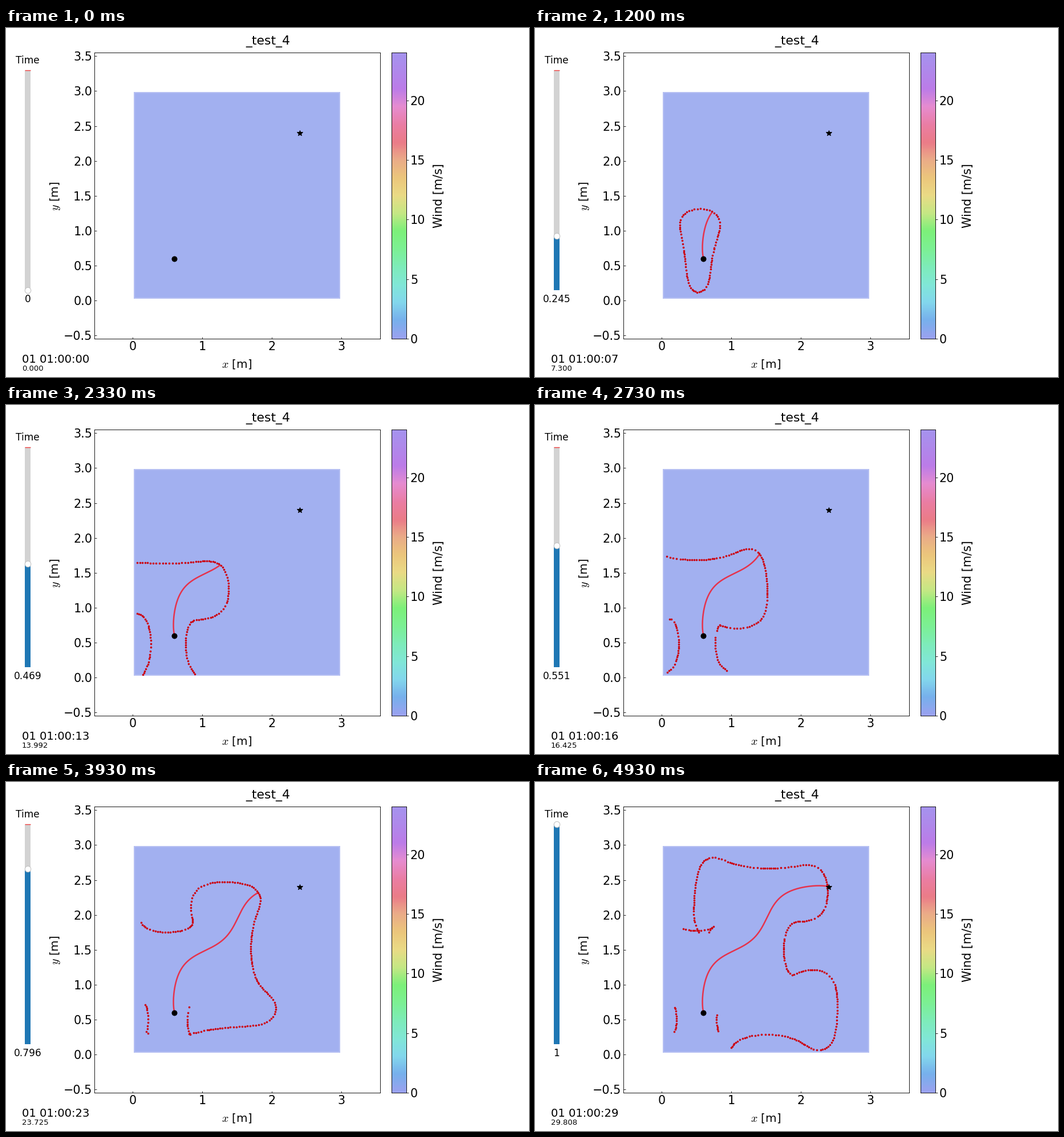
Write a matplotlib script that moves like this. It is 917 by 611 pixels and loops after 5060 ms.

```python
import numpy as np
import matplotlib.pyplot as plt
from matplotlib.animation import FuncAnimation
from matplotlib.colors import LinearSegmentedColormap
from matplotlib.patches import Rectangle

W, H, DPI = 917, 611, 72              # at 72 dpi one point is one pixel
INTERVAL, FRAMES = 20, 253
LAST, SUBSTEPS = 49, 6                # shown steps, solver steps in each
DURATION = 29.808
DT = DURATION / (LAST * SUBSTEPS)

START, GOAL = np.array([0.6, 0.6]), np.array([2.4, 2.4])
SPEED = 0.05                          # own speed of the traveller
FLOW = 0.02 * np.pi                   # peak speed of the gyres
LOW, HIGH = 0.04, 2.96                # dots beyond these limits vanish
MIN_GAP, MAX_GAP = 0.024, 0.055       # spacing of the dots
CELL, MEMORY = 0.06, 1.5              # wake grid size, seconds before it closes

plt.rcParams.update({
    "font.family": "DejaVu Sans", "mathtext.fontset": "cm",
    "axes.linewidth": 0.9, "font.size": 20.8,
})


# --- reachability front ----------------------------------------------------
def rates(pos, head):
    """Drift plus own speed, and the turning of the heading in the flow."""
    sx, sy = np.sin(np.pi * pos).T
    cx, cy = np.cos(np.pi * pos).T
    hx, hy = head.T
    drift = FLOW * np.column_stack([cx * sy, -sx * cy])
    own = SPEED * head / np.linalg.norm(head, axis=1, keepdims=True)
    turn = FLOW * np.pi * np.column_stack([sx * sy * hx + cx * cy * hy,
                                           -cx * cy * hx - sx * sy * hy])
    return drift + own, turn


def advance(pos, head):
    move, turn = rates(pos, head)
    move, turn = rates(pos + move * DT / 2, head + turn * DT / 2)
    head = head + turn * DT
    return pos + move * DT, head / np.linalg.norm(head, axis=1, keepdims=True)


def gaps(track):
    pos = track[:, -1]
    return np.linalg.norm(np.roll(pos, -1, axis=0) - pos, axis=1)


def simulate():
    """Return the front at every step and the track that ends at the goal."""
    angle = np.linspace(0, 2 * np.pi, 72, endpoint=False)
    head = np.column_stack([np.cos(angle), np.sin(angle)])
    track = np.stack([START + 0 * head, START + 0.002 * head], axis=1)
    linked = np.ones(len(head), bool)          # joined to the next dot
    cells = int(HIGH / CELL) + 1
    seen = np.full((cells, cells), np.nan)     # last visit of each cell
    fronts = [np.empty((0, 2))]

    for n in range(1, LAST * SUBSTEPS + 1):
        pos, head = advance(track[:, -1], head)
        track = np.concatenate([track, pos[:, None]], axis=1)

        # Drop dots that left the domain or entered an already swept cell.
        cell = np.clip((pos / CELL).astype(int), 0, cells - 1)
        stale = n * DT - seen[cell[:, 0], cell[:, 1]] > MEMORY
        alive = ((pos > LOW) & (pos < HIGH)).all(axis=1) & ~stale
        seen[cell[alive, 0], cell[alive, 1]] = n * DT
        linked &= alive & np.roll(alive, -1)
        track, head, linked = track[alive], head[alive], linked[alive]

        # Thin crowded dots, then fill wide gaps.
        if len(track) > 80:
            drop = linked & np.roll(linked, 1) & (gaps(track) < MIN_GAP)
            drop[::2] = False
            track, head, linked = track[~drop], head[~drop], linked[~drop]
        wide = np.flatnonzero(linked & (gaps(track) > MAX_GAP))
        after = (wide + 1) % len(track)
        track = np.insert(track, wide + 1, (track[wide] + track[after]) / 2, axis=0)
        head = np.insert(head, wide + 1, (head[wide] + head[after]) / 2, axis=0)
        linked = np.insert(linked, wide + 1, True)

        if n % SUBSTEPS == 0:
            fronts.append(track[:, -1].copy())

    nearest = np.linalg.norm(track[:, -1] - GOAL, axis=1).argmin()
    return fronts, track[nearest]


fronts, route = simulate()

# --- plot ------------------------------------------------------------------
fig = plt.figure(figsize=(W / DPI, H / DPI), dpi=DPI, facecolor="white")


def place(left, top, right, bottom, **kw):
    return fig.add_axes([left / W, 1 - bottom / H,
                         (right - left) / W, (bottom - top) / H], **kw)


ax = place(154.7, 43.2, 655.6, 544.2)
ax.set(xlim=(-0.55, 3.55), ylim=(-0.55, 3.55),
       xticks=range(4), yticks=np.arange(-0.5, 3.6, 0.5))
ax.tick_params(direction="in", length=3.5, pad=3.5, width=0.8)
ax.add_patch(Rectangle((0.025, 0.035), 2.95, 2.943, fc="#a2b0f0",
                       ec="#b6c0f3", lw=2))
path_line, = ax.plot([], [], color="#e6324b", lw=2.5)
dots, = ax.plot([], [], "o", ms=3.6, mew=0, color="#cc0310", zorder=3)
ax.plot(*START, "o", ms=10, mew=0, color="black", zorder=4)
ax.plot(*GOAL, "*", ms=11, mew=1, color="black", zorder=4)

WIND = ["#9aa2f0", "#77b0ec", "#83d7ed", "#81e7d7", "#7eecb9", "#7cf094",
        "#7cf07a", "#c4e884", "#eadb86", "#ecc67c", "#eaac88", "#ea7c88",
        "#ea7ea4", "#e68cd0", "#bc7ce8", "#b088eb", "#a693ee"]
bar = place(676.2, 43.2, 702, 544.2)
bar.imshow(np.linspace(0, 1, 256)[:, None], origin="lower", aspect="auto",
           cmap=LinearSegmentedColormap.from_list("wind", WIND),
           extent=(0, 1, 0, 24))
bar.set(xticks=[], yticks=range(0, 21, 5))
bar.yaxis.tick_right()
bar.tick_params(length=3.5, pad=3.5, width=0.8)

# --- labels and slider, in pixel coordinates -------------------------------
stage = place(0, 0, W, H, zorder=5)
stage.set(xlim=(0, W), ylim=(H, 0))
stage.axis("off")


def label(x, y, text, size, ha="center", va="baseline", **kw):
    return stage.text(x, y, text, fontsize=size, ha=ha, va=va, **kw)


label(459, 28.5, "_test_4", 22)
label(405, 594.5, "$x$ [m]", 20)
label(86, 294, "$y$ [m]", 20, va="center", rotation=90)
label(759, 294, "Wind [m/s]", 20.8, va="center", rotation=90)
label(38, 62, "Time", 17)
value_text = label(38, 479.5, "", 17)
clock_text = label(28, 586.5, "", 19.6, ha="left")
seconds_text = label(28, 600, "", 13.3, ha="left")

TOP, BOTTOM = 73.5, 458.5
stage.add_patch(Rectangle((33, TOP), 10, BOTTOM - TOP, fc="#d3d3d3", lw=0))
stage.plot([33, 43], [TOP, TOP], color="#f04040", lw=1.4,
           solid_capstyle="butt")
fill = stage.add_patch(Rectangle((33, BOTTOM), 10, 0, fc="#1f77b4", lw=0))
handle, = stage.plot([38], [BOTTOM], "o", ms=10.5, mfc="white", mec="0.75",
                     mew=1, zorder=4)


# --- animation -------------------------------------------------------------
def step_at(ms):
    """Steps alternate between 130 ms and 70 ms."""
    return min(2 * int(ms // 200) + (ms % 200 >= 130), LAST)


def update(frame):
    step = step_at((frame + 0.5) * INTERVAL)
    share = step / LAST
    y = BOTTOM + (TOP - BOTTOM) * share
    fill.set_y(y)
    fill.set_height(BOTTOM - y)
    handle.set_ydata([y])
    value_text.set_text(f"{share:.3g}")
    clock_text.set_text(f"01 01:00:{int(DURATION * share):02d}")
    seconds_text.set_text(f"{DURATION * share:.3f}")
    path_line.set_data(*route[:SUBSTEPS * step + 2].T)
    dots.set_data(*fronts[step].T)
    return fill, handle, value_text, clock_text, seconds_text, path_line, dots


animation = FuncAnimation(fig, update, frames=FRAMES, interval=INTERVAL,
                          repeat=True, repeat_delay=0, blit=False)
plt.show()
```
